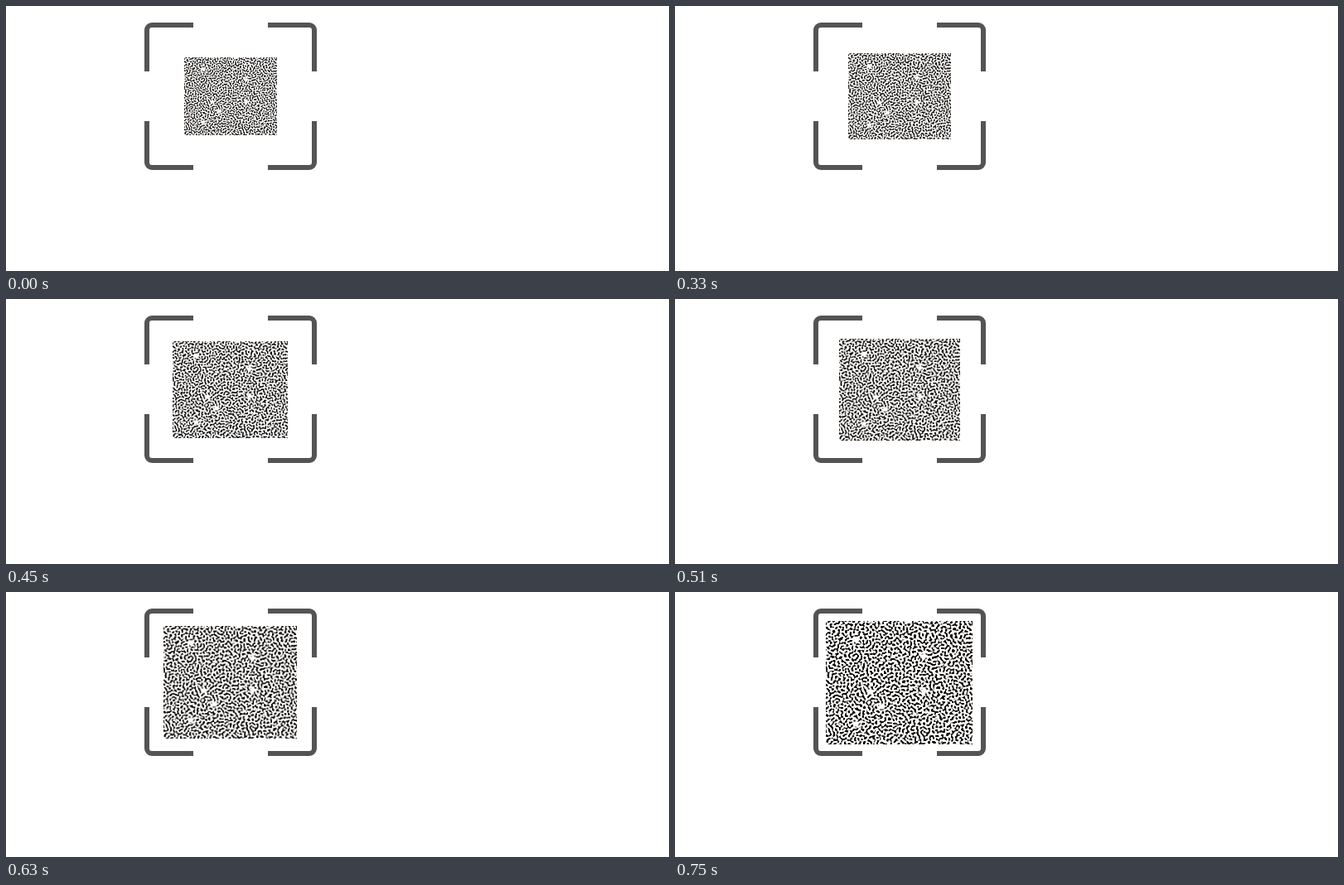
An HTML page with a canvas that plays this animation: 800x320 px, repeating every 950 ms.

```html
<!DOCTYPE html>
<html lang="en">
<head>
<meta charset="utf-8">
<title>Texture scan</title>
<style>
  html, body { margin: 0; width: 800px; height: 320px; overflow: hidden; background: #fff; }
  canvas { display: block; }
</style>
</head>
<body>
<canvas id="stage" width="800" height="320"></canvas>
<script>
const ctx = document.getElementById('stage').getContext('2d');
const W = 177, H = 149;
const LOOP = 950, HOLD = 270, STEP = 30, STEPS = 17;
const SMALL = [215, 62, 327, 156], LARGE = [182, 35, 359, 184]; // left, top, right, bottom

function random(seed) {
  return () => {
    seed = (seed * 1664525 + 1013904223) >>> 0;
    return seed / 4294967296;
  };
}

// One binomial blur pass with wrapped edges
function blur(src) {
  const mid = new Float32Array(W * H), out = new Float32Array(W * H);
  for (let y = 0; y < H; y++) {
    for (let x = 0; x < W; x++) {
      const row = y * W;
      mid[row + x] = (src[row + (x + W - 1) % W] + 2 * src[row + x] + src[row + (x + 1) % W]) / 4;
    }
  }
  for (let y = 0; y < H; y++) {
    const up = (y + H - 1) % H * W, down = (y + 1) % H * W;
    for (let x = 0; x < W; x++) {
      out[y * W + x] = (mid[up + x] + 2 * mid[y * W + x] + mid[down + x]) / 4;
    }
  }
  return out;
}

// Random noise sharpened step by step into short dark strokes on white
function makeTexture() {
  const rnd = random(4711);
  let field = Float32Array.from({ length: W * H }, () => rnd() * 2 - 1);
  for (let pass = 0; pass < 3; pass++) {
    const near = blur(field);
    let far = near;
    for (let i = 0; i < 3; i++) far = blur(far);
    field = near.map((v, i) => Math.tanh(5 * (v - far[i]) + 0.22));
  }

  const gaps = [[36, 22], [53, 85], [118, 84], [36, 124], [118, 42], [67, 103]];
  const tile = document.createElement('canvas');
  tile.width = W;
  tile.height = H;
  const tctx = tile.getContext('2d');
  const img = tctx.createImageData(W, H);
  field.forEach((v, i) => {
    const x = i % W, y = Math.floor(i / W);
    for (const [gx, gy] of gaps) v += 2.4 * Math.exp(-((x - gx) ** 2 + (y - gy) ** 2) / 10);
    const light = Math.max(0, Math.min(1, 0.58 + v * 0.68));
    img.data.set([12 + 242 * light, 9 + 244 * light, 9 + 241 * light, 255], i * 4);
  });
  tctx.putImageData(img, 0, 0);
  return tile;
}

function drawCorner(x, y, sx, sy) {
  ctx.beginPath();
  ctx.moveTo(x, y + 56 * sy);
  ctx.arcTo(x, y, x + 56 * sx, y, 6);
  ctx.lineTo(x + 56 * sx, y);
  ctx.stroke();
}

const texture = makeTexture();

function draw() {
  const t = performance.now() % LOOP;
  const step = t < HOLD ? 0 : Math.min(STEPS, 1 + Math.floor((t - HOLD) / STEP));
  const [l, top, r, b] = SMALL.map((v, i) => Math.round(v + (LARGE[i] - v) * step / STEPS));

  ctx.fillStyle = '#fff';
  ctx.fillRect(0, 0, 800, 320);
  ctx.imageSmoothingQuality = 'low';
  ctx.drawImage(texture, l, top, r - l, b - top);

  ctx.strokeStyle = '#545454';
  ctx.lineWidth = 6;
  drawCorner(170, 23, 1, 1);
  drawCorner(372, 23, -1, 1);
  drawCorner(170, 195, 1, -1);
  drawCorner(372, 195, -1, -1);
  requestAnimationFrame(draw);
}
draw();
</script>
</body>
</html>
```
